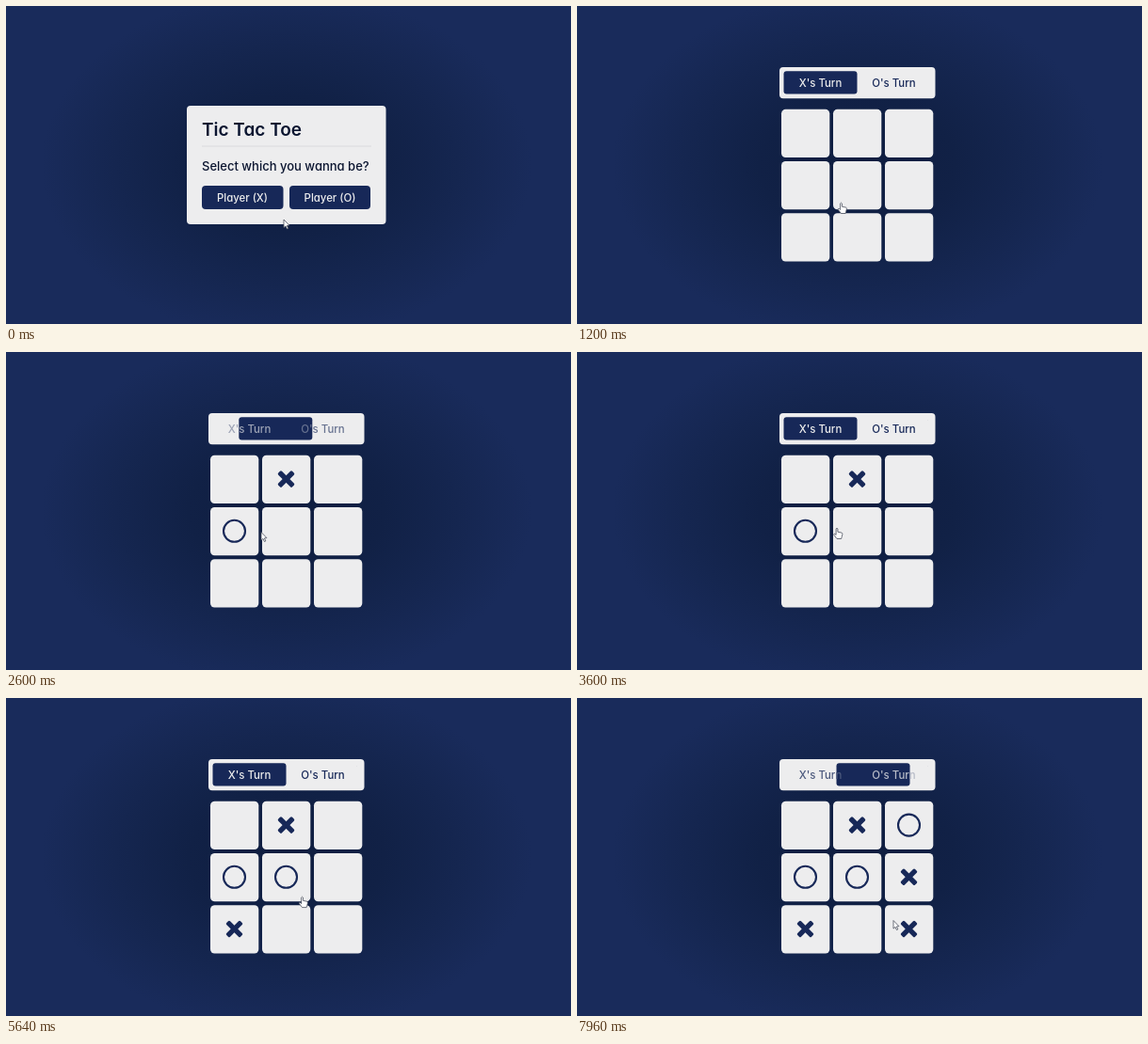
An HTML page that plays this animation: 600 by 338 pixels, repeating every 8000 ms.

```html
<!DOCTYPE html>
<html lang="en">
<head>
<meta charset="utf-8">
<title>Tic Tac Toe</title>
<style>
  html, body { margin: 0; width: 100%; height: 100%; overflow: hidden; background: #192b5b; }
  svg { display: block; width: 100vw; height: 100vh; }
  text { font-family: Inter, Lato, sans-serif; font-weight: 500; font-feature-settings: "cv11"; }
  .mid { text-anchor: middle; }
  .paper { fill: #ededee; }
  .navy { fill: #172858; }
  .small { font-size: 11.4px; }
</style>
</head>
<body>
<svg viewBox="0 0 600 338">
  <defs>
    <radialGradient id="glow" gradientUnits="userSpaceOnUse" cx="0" cy="0" r="1"
      gradientTransform="translate(298 169) scale(260 185)">
      <stop offset="0" stop-color="#0f1d3f"/>
      <stop offset=".4" stop-color="#112146"/>
      <stop offset=".7" stop-color="#152650"/>
      <stop offset="1" stop-color="#192b5b"/>
    </radialGradient>
    <g id="x" class="navy">
      <rect x="-10.5" y="-2.7" width="21" height="5.4" rx="1.5" transform="rotate(45)"/>
      <rect x="-10.5" y="-2.7" width="21" height="5.4" rx="1.5" transform="rotate(-45)"/>
    </g>
    <circle id="o" r="11.5" fill="none" stroke="#172858" stroke-width="2.1"/>
  </defs>
  <rect width="600" height="338" fill="url(#glow)"/>

  <g id="popup">
    <rect class="paper" x="192" y="106" width="211.5" height="126" rx="4"/>
    <text x="208" y="138.3" font-size="19" style="font-weight:600" fill="#0b1530">Tic Tac Toe</text>
    <path d="M208 149H388" stroke="#dadadd"/>
    <text x="208" y="175" font-size="13" fill="#0b1530">Select which you wanna be?</text>
    <rect id="pickX" class="navy" x="208" y="191" width="86.5" height="25" rx="4"/>
    <text id="pickXText" class="mid small" x="251" y="208">Player (X)</text>
    <rect class="navy" x="301" y="191" width="86" height="25" rx="4"/>
    <text class="mid small" x="344" y="208" fill="#ededee">Player (O)</text>
  </g>

  <g id="board">
    <rect class="paper" x="215" y="65" width="165.5" height="33.2" rx="4"/>
    <rect id="slider" class="navy" y="69.3" width="78" height="24.3" rx="3"/>
    <text id="turnX" class="mid small" x="258.5" y="86.3">X's Turn</text>
    <text id="turnO" class="mid small" x="336.5" y="86.3">O's Turn</text>
    <g id="cells"></g>
    <g id="marks"></g>
  </g>

  <g id="cursor" stroke="#4a4f5c" stroke-width=".8" stroke-linejoin="round" fill="#fff">
    <path id="arrow" d="M0 0V8.6L2 6.9L3.4 10L4.8 9.4L3.4 6.4L5.9 6.1Z"/>
    <path id="hand" d="M-.9 .9Q0-.6 .9 .9V4.2L5 5.1Q6 5.4 5.9 6.6L5.2 9.5L4.6 11.5H0L-3.2 7.4Q-3.4 6 -2.2 6.3L-.9 7.4Z"/>
  </g>
</svg>
<script>
const LOOP = 8000, FADE = 300, START = 918;
const $ = id => document.getElementById(id);
const NS = "http://www.w3.org/2000/svg";
const colX = c => 217 + 55 * c, rowY = r => 109.8 + 55.2 * r;

// time, mark, column, row
const moves = [
  [1800, "x", 1, 0], [2492, "o", 0, 1],
  [3980, "x", 0, 2], [4553, "o", 1, 1],
  [5950, "x", 2, 1], [6690, "o", 2, 0],
  [7825, "x", 2, 2]
];
// time, x, y of the pointer tip
const path = [
  [40, 295, 227], [640, 280.5, 209], [1220, 280.5, 209], [1640, 301, 129],
  [1830, 301, 129], [2600, 271, 191.5], [2960, 281, 202], [3440, 273, 186],
  [3600, 276, 187], [3760, 276, 187], [3960, 256, 235], [4560, 261, 236.5],
  [5420, 283, 229], [5880, 350, 191], [5990, 350, 191], [6720, 331, 237],
  [7040, 326, 236], [7320, 326, 236], [7560, 336, 236.5]
];
const handTimes = [[320, 1800], [2650, 3980], [4950, 5950], [6750, 7825]];

function add(parent, tag, attrs) {
  const el = document.createElementNS(NS, tag);
  for (const k in attrs) el.setAttribute(k, attrs[k]);
  return $(parent).appendChild(el);
}

for (let i = 0; i < 9; i++)
  add("cells", "rect", { class: "paper", x: colX(i % 3), y: rowY(i / 3 | 0), width: 51.3, height: 51.3, rx: 4.5 });

const marks = moves.map(([, kind, c, r]) =>
  add("marks", "use", { href: "#" + kind, x: colX(c) + 25.5, y: rowY(r) + 25.3 }));

// cubic-bezier(.25, .1, .25, 1)
function ease(p) {
  if (p <= 0) return 0;
  if (p >= 1) return 1;
  const bez = (a, b, u) => 3 * a * u * (1 - u) ** 2 + 3 * b * u * u * (1 - u) + u ** 3;
  let lo = 0, hi = 1;
  for (let i = 0; i < 20; i++) {
    const m = (lo + hi) / 2;
    if (bez(.25, .25, m) < p) lo = m; else hi = m;
  }
  return bez(.1, 1, lo);
}
const fade = (t, from) => ease((t - from) / FADE);
const mix = (a, b, p) => a + (b - a) * p;
const ink = p => `rgb(${[23, 40, 88].map(v => Math.round(mix(v, 237, p)))})`;

function scaled(el, s, alpha, cx, cy) {
  el.setAttribute("transform", `translate(${cx} ${cy}) scale(${s}) translate(${-cx} ${-cy})`);
  el.setAttribute("opacity", alpha);
}

function tipAt(t) {
  const i = path.findIndex(k => k[0] > t);
  if (i === 0) return path[0].slice(1);
  if (i < 0) return path[path.length - 1].slice(1);
  const a = path[i - 1], b = path[i];
  const p = (t - a[0]) / (b[0] - a[0]), s = p * p * (3 - 2 * p);
  return [mix(a[1], b[1], s), mix(a[2], b[2], s)];
}

function draw(t) {
  const hover = fade(t, 320), show = fade(t, START);
  $("pickX").setAttribute("opacity", 1 - hover);
  $("pickXText").setAttribute("fill", ink(1 - hover));
  scaled($("popup"), 1 - .1 * show, 1 - show, 297.7, 169);
  scaled($("board"), .9 + .1 * show, show, 297.7, 168.4);

  let turn = 0;
  moves.forEach(([at, kind], i) => {
    marks[i].setAttribute("visibility", t >= at ? "inherit" : "hidden");
    if (t >= at) turn = kind === "x" ? fade(t, at) : 1 - fade(t, at);
  });
  $("slider").setAttribute("x", mix(219.5, 294, turn));
  $("turnX").setAttribute("fill", ink(1 - turn));
  $("turnO").setAttribute("fill", ink(turn));

  const hand = handTimes.some(([a, b]) => t >= a && t < b);
  $("hand").setAttribute("visibility", hand ? "visible" : "hidden");
  $("arrow").setAttribute("visibility", hand ? "hidden" : "visible");
  $("cursor").setAttribute("transform", `translate(${tipAt(t)})`);
}

function tick() {
  draw(performance.now() % LOOP);
  requestAnimationFrame(tick);
}
tick();
</script>
</body>
</html>
```
